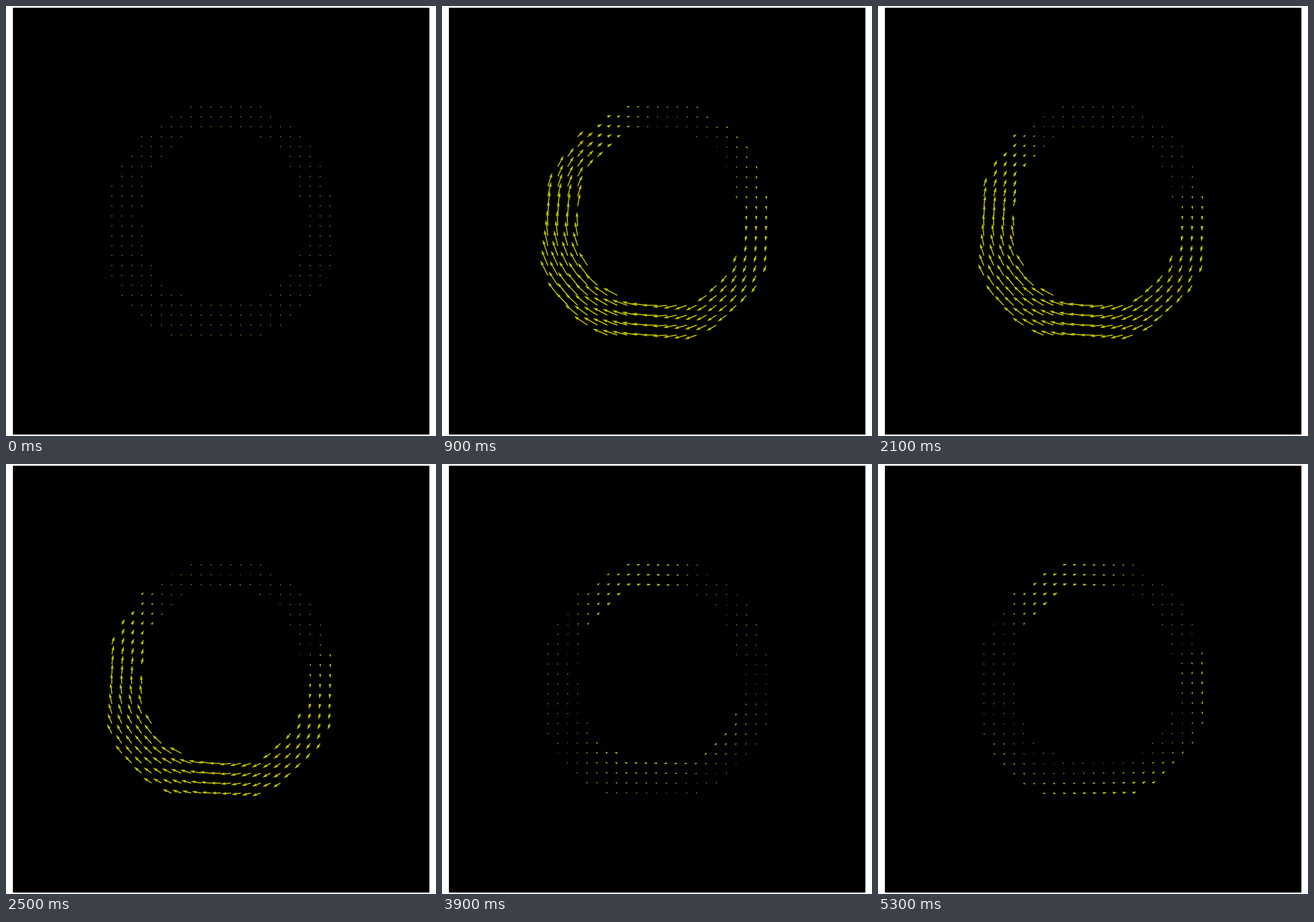
These frames come from a looping animation (748 px wide and 748 px high, 5400 ms). An HTML page with a canvas:

```html
<!DOCTYPE html>
<html lang="en">
<head>
<meta charset="utf-8">
<title>Ring flow</title>
<style>
html, body { margin: 0; width: 100%; height: 100%; overflow: hidden; background: #fff; }
canvas { display: block; }
</style>
</head>
<body>
<canvas id="stage" width="748" height="748"></canvas>
<script>
const ctx = document.getElementById('stage').getContext('2d');
const LOOP = 5400, STEP = 100;
const CENTRE = 374, PITCH = 17.25, LEFT = 184.2, TOP = 175.6;
const SHAFT = 1.74;

// Occupied column spans of each grid row.
const rows = ('8-15 6-16 5-18 3-7,15-19 3-6,17-20 2-5,18-20 1-4,18-21 1-3,19-21 ' +
  '0-3,19-21 0-3,19-22 0-3,20-22 0-2,20-22 0-3,20-22 0-3,20-22 0-3,20-22 ' +
  '0-3,19-22 0-4,19-22 0-4,18-21 1-5,17-21 1-7,16-20 2-19 3-18 4-17 6-15').split(' ');

const points = rows.flatMap((row, r) => row.split(',').flatMap(span => {
  const [from, to] = span.split('-').map(Number);
  return Array.from({ length: to - from + 1 }, (_, i) => {
    const x = LEFT + (from + i) * PITCH, y = TOP + r * PITCH;
    const dx = x - CENTRE, dy = y - CENTRE;
    return {
      x, y,
      angle: Math.atan2(dy, dx),
      depth: Math.max(-1, Math.min(1, (Math.hypot(dx, dy) - 174) / 26))
    };
  });
}));

// Clockwise speed around the ring, starting at the right, and its outward gain.
const keys = [
  { at: 0, speed: [0], gain: [0] },
  { at: 500, speed: [12, 18, 24, 28, 30, 31, 30, 25, 16, 8, 6, 9], gain: [0] },
  { at: 900, speed: [8, 15, 20, 26, 28, 28, 26, 20, 9, 2.5, 2.2, 4], gain: [0, 0, 0, 2, 0, 2] },
  { at: 1600, speed: [9, 19, 27, 31, 31, 27, 23, 14, 4, 1, 1, 2.5], gain: [0] },
  { at: 2500, speed: [7, 12, 16, 19, 20, 19, 17, 9, 1.6, -2.5, -2.2, 1], gain: [1, -1, -3, 2, 1, 2] },
  { at: 3100, speed: [7, 7, 5.5, 3.5, 2, 1, 1, -1.5, 1, 1, 2.2, 7], gain: [-1, -3, -1.5, 0.5, 0, 0.5], power: 2 },
  { at: 3900, speed: [2, 4, 3.5, 4, 4.5, 2, 1, 2.5, 6.5, 6.5, 1.5, 3], gain: [0, -2.2, -1, -0.5, -1.5, 0] },
  { at: 5300, speed: [-5, -2, -4, -4.5, -2.5, -2.5, 0.5, 2.5, 8, 6, 1.4, -0.8], gain: [-1.2, -2.8, -2, -0.5, -1, 0] }
];

// Smooth periodic curve through evenly spaced values.
function around(values, angle) {
  const n = values.length;
  const pos = (angle / (2 * Math.PI) + 1) * n;
  const i = Math.floor(pos), u = pos - i;
  const [a, b, c, d] = [-1, 0, 1, 2].map(k => values[(i + k + n) % n]);
  return b + u * ((c - a) + u * (2 * a - 5 * b + 4 * c - d + u * (3 * (b - c) + d - a))) / 2;
}

function flow(key, p) {
  return around(key.speed, p.angle) + around(key.gain, p.angle) * p.depth;
}

function dot(x, y) {
  ctx.beginPath();
  for (let i = 0; i < 6; i++) {
    const a = i * Math.PI / 3;
    ctx.lineTo(x + SHAFT / 2 * Math.cos(a), y + SHAFT / 2 * Math.sin(a));
  }
  ctx.fill();
}

function arrow(p, speed) {
  const length = Math.abs(speed) / SHAFT;
  if (length < 1) return dot(p.x, p.y);
  const scale = SHAFT * Math.min(1, length / 5);
  const tip = Math.max(5, length);
  ctx.save();
  ctx.translate(p.x, p.y);
  ctx.rotate(p.angle + Math.sign(speed) * Math.PI / 2);
  ctx.scale(scale, scale);
  ctx.beginPath();
  ctx.moveTo(0, -0.5);
  ctx.lineTo(tip - 4.5, -0.5);
  ctx.lineTo(tip - 5, -1.5);
  ctx.lineTo(tip, 0);
  ctx.lineTo(tip - 5, 1.5);
  ctx.lineTo(tip - 4.5, 0.5);
  ctx.lineTo(0, 0.5);
  ctx.fill();
  ctx.restore();
}

function draw(ms) {
  const time = Math.floor((ms % LOOP) / STEP) * STEP;
  const next = Math.max(1, keys.findIndex(k => k.at >= time));
  const a = keys[next - 1], b = keys[next];
  const mix = ((time - a.at) / (b.at - a.at)) ** (b.power || 1);
  ctx.fillStyle = '#fff';
  ctx.fillRect(0, 0, 748, 748);
  ctx.fillStyle = '#000';
  ctx.fillRect(12, 3, 724.5, 742.5);
  ctx.fillStyle = '#bfbf00';
  for (const p of points) arrow(p, flow(a, p) * (1 - mix) + flow(b, p) * mix);
}

const start = performance.now();
function tick() {
  draw(performance.now() - start);
  requestAnimationFrame(tick);
}
tick();
</script>
</body>
</html>
```
